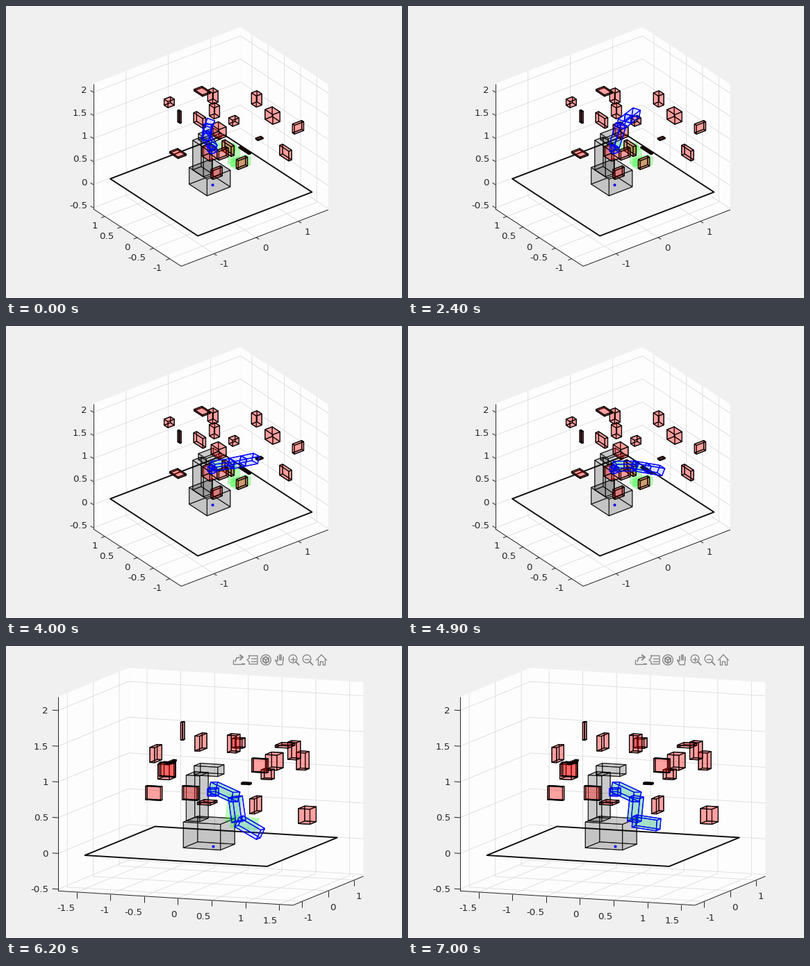
Recreate the animation shown at these times as a matplotlib script. Size 570 px wide and 420 px high, loop 7100 ms.

```python
import numpy as np
import matplotlib
import matplotlib.pyplot as plt
from matplotlib.animation import FuncAnimation
from matplotlib.collections import LineCollection, PolyCollection
from matplotlib.patches import Circle

W, H, DPI = 570, 420, 100
PX = 72 / DPI  # points per pixel
FRAMES, INTERVAL = 71, 100
TOOLBAR_ON, TURN = 58, 62
INK = "#262626"
TOOL = "#858585"

matplotlib.rcParams["font.family"] = "DejaVu Sans"
fig = plt.figure(figsize=(W / DPI, H / DPI), dpi=DPI, facecolor="#f0f0f0")
ax = fig.add_axes([0, 0, 1, 1])
ax.set_xlim(0, W)
ax.set_ylim(H, 0)
ax.axis("off")

MID = -0.035  # x of the room's centre
LIM = np.array([[MID - 1.74, MID + 1.74], [-1.355, 1.355], [-0.525, 2.19]])
FLOOR = 2.7
TICK = 0.085


class View:
    """Orthographic camera given by azimuth, elevation and pixels per unit."""

    def __init__(self, az, el, scale, origin):
        a, e = np.radians([az, el])
        right = [np.cos(a), np.sin(a), 0]
        up = [-np.sin(a) * np.sin(e), np.cos(a) * np.sin(e), np.cos(e)]
        self.m = scale * np.array([right, np.negative(up)]).T
        self.origin = np.array(origin)

    def __call__(self, pts):
        return self.origin + np.asarray(pts, float) @ self.m


FACES = [[0, 1, 3, 2], [4, 5, 7, 6], [0, 1, 5, 4],
         [2, 3, 7, 6], [0, 2, 6, 4], [1, 3, 7, 5]]
SIGNS = np.array([[i, j, k] for i in (-1, 1) for j in (-1, 1) for k in (-1, 1)])


def faces(center, frame):
    """Six quads of a box; the rows of frame are its half axes."""
    return (np.array(center) + SIGNS @ np.array(frame))[FACES]


def cuboid(center, size):
    return faces(center, np.diag(size) / 2)


def beam(p, q, width):
    d = q - p
    u = np.cross(d, [0, 1, 0])
    u /= np.linalg.norm(u)
    v = np.cross(d, u)
    v /= np.linalg.norm(v)
    return faces((p + q) / 2, [d / 2, u * width / 2, v * width / 2])


# ---- robot body, obstacles ----
BODY = np.concatenate([
    cuboid((-.06, 0, .18), (.55, .55, .36)),
    cuboid((-.235, 0, .68), (.2, .33, .64)),
    cuboid((-.06, 0, 1.065), (.35, .24, .13)),
])

# size of each kind of obstacle -> centres
KINDS = {
    (.17, .24, .21): [(1.08, -.45, 1.32), (-.48, -.54, 1.11), (.98, 1.08, .33)],
    (.15, .12, .13): [(-.09, 1.21, 1.26), (.71, .26, 1.01)],
    (.13, .15, .24): [(.89, 1.14, 1.08), (.22, .22, 1.42), (1.15, .13, 1.39)],
    (.07, .28, .21): [(-.22, .10, 1.43), (1.0, -.96, .78), (-.44, -1.06, 1.43)],
    (.22, .06, .19): [(1.14, -1.16, 1.37), (-.37, -.80, 1.17),
                      (.01, -.90, .88), (-.55, -.85, .84)],
    (.19, .26, .03): [(.63, 1.13, 1.28), (-.33, .63, .50)],
    (.04, .31, .02): [(-.16, -1.21, 1.35)],
    (.12, .07, .02): [(.70, -.54, 1.0)],
    (.03, .07, .25): [(-.56, .28, 1.54)],
}
OBSTACLES = np.concatenate(
    [cuboid(c, size) for size, centers in KINDS.items() for c in centers])

# ---- arm ----
HUB = np.array([0, 0, 0.76])
SHOULDER = np.array([0, 0, 0.83])
LINKS = [(0.44, 0.14), (0.34, 0.15), (0.36, 0.15)]  # length, width
# heading and tilt of the upper arm, heading and two tilts of the outer links
POSE_AT = [0, 16, 32, 49, 64, 70]
POSES = np.array([
    [28, -38, 47, 90, 106],
    [50, -12, 38, 105, 105],
    [4, 98, 19, 94, 94],
    [-11, 104, 0, 117, 117],
    [-25, 102, 0, 180, 116],
    [-25, 102, 0, 186, 95],
])


def direction(heading, tilt):
    h, t = np.radians([heading, tilt])
    return np.array([np.sin(t) * np.cos(h), np.sin(t) * np.sin(h), np.cos(t)])


def arm(t):
    turn, lift, swing, bend, tip = (np.interp(t, POSE_AT, c) for c in POSES.T)
    parts = [cuboid(HUB, (.12, .12, .10))]
    p = SHOULDER
    angles = [(turn, lift), (swing, bend), (swing, tip)]
    for angle, (length, width) in zip(angles, LINKS):
        q = p + length * direction(*angle)
        parts.append(beam(p, q, width))
        p = q
    return np.concatenate(parts)


# ---- drawing helpers ----
def polys(verts, face, edge, lw, z):
    c = PolyCollection(list(verts), facecolors=[face], edgecolors=[edge],
                       linewidths=lw * PX, zorder=z, joinstyle="round")
    return ax.add_collection(c)


def lines(segs, color, lw, z):
    return ax.add_collection(
        LineCollection(list(segs), colors=color, linewidths=lw * PX, zorder=z))


def tick_values(axis, step):
    lo, hi = LIM[axis]
    return np.arange(np.ceil(lo / step), np.floor(hi / step) + 1) * step


def label(xy, value, ha):
    return ax.text(*xy, f"{value:g}", ha=ha, va="center_baseline",
                   fontsize=13.33 * PX, color=INK, zorder=3)


def scene(view, side, steps, rulers):
    """Static artists; side is the x of the side wall, rulers lists for each
    axis its anchor, tick vector, label offset and alignment."""
    (x0, x1), (y0, y1), (z0, z1) = LIM
    out = []
    bottom = [(x0, y0, z0), (x1, y0, z0), (x1, y1, z0), (x0, y1, z0)]
    back = [(x0, y1, z0), (x1, y1, z0), (x1, y1, z1), (x0, y1, z1)]
    wall = [(side, y0, z0), (side, y1, z0), (side, y1, z1), (side, y0, z1)]
    planes = [view(p) for p in (bottom, back, wall)]
    out.append(polys(planes, "#fdfdfd", "#fdfdfd", 0.3, 0))

    ticks = [tick_values(i, s) for i, s in enumerate(steps)]
    xs, ys, zs = ticks
    far = x0 + x1 - side
    grid = [[(x, y0, z0), (x, y1, z0), (x, y1, z1)] for x in xs]
    grid += [[(far, y, z0), (side, y, z0), (side, y, z1)] for y in ys]
    grid += [[(side, y0, z), (side, y1, z), (far, y1, z)] for z in zs]
    out.append(lines([view(g) for g in grid], "#dedede", 0.9, 1))

    for axis, (anchor, tick, offset, ha) in enumerate(rulers):
        ends = np.array([anchor, anchor], float)
        ends[:, axis] = LIM[axis]
        segs = [view(ends)]
        for v in ticks[axis]:
            p = np.array(anchor, float)
            p[axis] = v
            segs.append(view([p, p + tick]))
            out.append(label(view(p) + offset, v, ha))
        out.append(lines(segs, INK, 1, 3))

    floor = cuboid((MID, 0, 0), (FLOOR, FLOOR, 0))[4]
    out.append(polys([view(floor)], "#f7f7f7", "#0c0c0c", 1.9, 4))
    out.append(polys(view(BODY), (0, 0, 0, .105), (0, 0, 0, .7), 1.1, 5))
    out.append(polys(view(arm(FRAMES - 1)), (0, 1, 0, .13), (0, 1, 0, .15), 0.6, 6))
    out.append(polys(view(OBSTACLES), (1, 0, 0, .2), (0, 0, 0, .9), 1.2, 7))
    out += ax.plot(*view((0, 0, 0)), "o", color="blue", ms=4 * PX, mew=0, zorder=8)
    return out


# ---- toolbar ----
def stroke(*pts, lw=1.3):
    xy = np.array(pts).T
    return ax.plot(*xy, color=TOOL, lw=lw * PX, zorder=10,
                   solid_joinstyle="round")[0]


def ring(x, y, r):
    return ax.add_patch(Circle((x, y), r, fill=False, ec=TOOL,
                               lw=1.3 * PX, zorder=10))


def export(x, y):
    return [stroke((x - 7, y), (x - 7, y + 6), (x + 4, y + 6)),
            stroke((x - 4, y + 2), (x - 2, y - 3), (x + 6, y - 4), lw=1.6),
            stroke((x + 3, y - 7), (x + 7, y - 4), (x + 3, y), lw=1.8),
            stroke((x + 6, y + 6), (x + 9, y + 6), lw=2)]


def data_tip(x, y):
    frame = stroke((x - 4, y - 6), (x + 8, y - 6), (x + 8, y + 6), (x - 4, y + 6),
                   (x - 4, y + 2.5), (x - 7, y), (x - 4, y - 2.5), (x - 4, y - 6))
    return [frame] + [stroke((x - 1, y + d), (x + 5.5, y + d)) for d in (-2, 2)]


def rotate(x, y):
    a = np.radians(30 + 60 * np.arange(7))
    rim = np.c_[x + 4.5 * np.cos(a), y + 4.5 * np.sin(a)]
    spokes = [stroke((x, y), rim[k], lw=1.5) for k in (1, 3, 5)]
    return [ring(x, y, 7.3), stroke(*rim, lw=1.8)] + spokes


def hand(x, y):
    fingers = [stroke((x - 3 + 2.6 * k, y), (x - 3 + 2.6 * k, y - 7 + (k - 1.3) ** 2),
                      lw=1.6) for k in range(4)]
    palm = stroke((x - 3, y + 2), (x - 6.5, y), (x - 3, y + 7), (x + 4, y + 7),
                  (x + 5, y))
    return fingers + [palm]


def zoom(x, y, plus):
    out = [ring(x - 1, y - 1.5, 5.8), stroke((x + 3, y + 2.5), (x + 7.5, y + 7), lw=1.8),
           stroke((x - 4, y - 1.5), (x + 2, y - 1.5))]
    if plus:
        out.append(stroke((x - 1, y - 4.5), (x - 1, y + 1.5)))
    return out


def home(x, y):
    return [stroke((x - 7.5, y + .5), (x, y - 7.5), (x + 7.5, y + .5)),
            stroke((x - 5, y - 1), (x - 5, y + 7), (x - 1.7, y + 7), (x - 1.7, y + 1.5),
                   (x + 1.7, y + 1.5), (x + 1.7, y + 7), (x + 5, y + 7), (x + 5, y - 1))]


def toolbar():
    icons = [export, data_tip, rotate, hand,
             lambda x, y: zoom(x, y, True), lambda x, y: zoom(x, y, False), home]
    return [a for k, icon in enumerate(icons) for a in icon(334 + 20 * k, 20)]


# ---- two camera views ----
(X0, X1), (Y0, Y1), (Z0, Z1) = LIM
view_a = View(-37.5, 30, 76.7, (296.9, 256.8))
view_b = View(21.06, 9.1, 104.1, (298.1, 288.0))

scene_a = scene(view_a, X1, (1, .5, .5), [
    ((0, Y0, Z0), (0, -TICK, 0), (8.5, 14), "left"),
    ((X0, 0, Z0), (-TICK, 0, 0), (-10.5, 12.5), "right"),
    ((X0, Y1, 0), (0, TICK, 0), (-8.5, -4.5), "right"),
])
scene_b = scene(view_b, X0, (.5, 1, .5), [
    ((0, Y0, Z0), (0, 0, -TICK), (-2, 22.5), "right"),
    ((X1, 0, Z0), (0, 0, -TICK), (2.5, 22.5), "left"),
    ((X0, Y0, 0), (-TICK, 0, 0), (-14, -0.5), "right"),
])
tools = toolbar()
robot = polys(view_a(arm(0)), (0, .2, 1, .07), (0, 0, 1, .95), 1.2, 9)


def show(artists, on):
    for a in artists:
        a.set_visible(on)


def update(i):
    turned = i >= TURN
    show(scene_a, not turned)
    show(scene_b, turned)
    show(tools, i >= TOOLBAR_ON)
    robot.set_verts(list((view_b if turned else view_a)(arm(i))))
    return [robot]


anim = FuncAnimation(fig, update, frames=FRAMES, interval=INTERVAL,
                     repeat=True, repeat_delay=0, blit=False)
plt.show()
```
